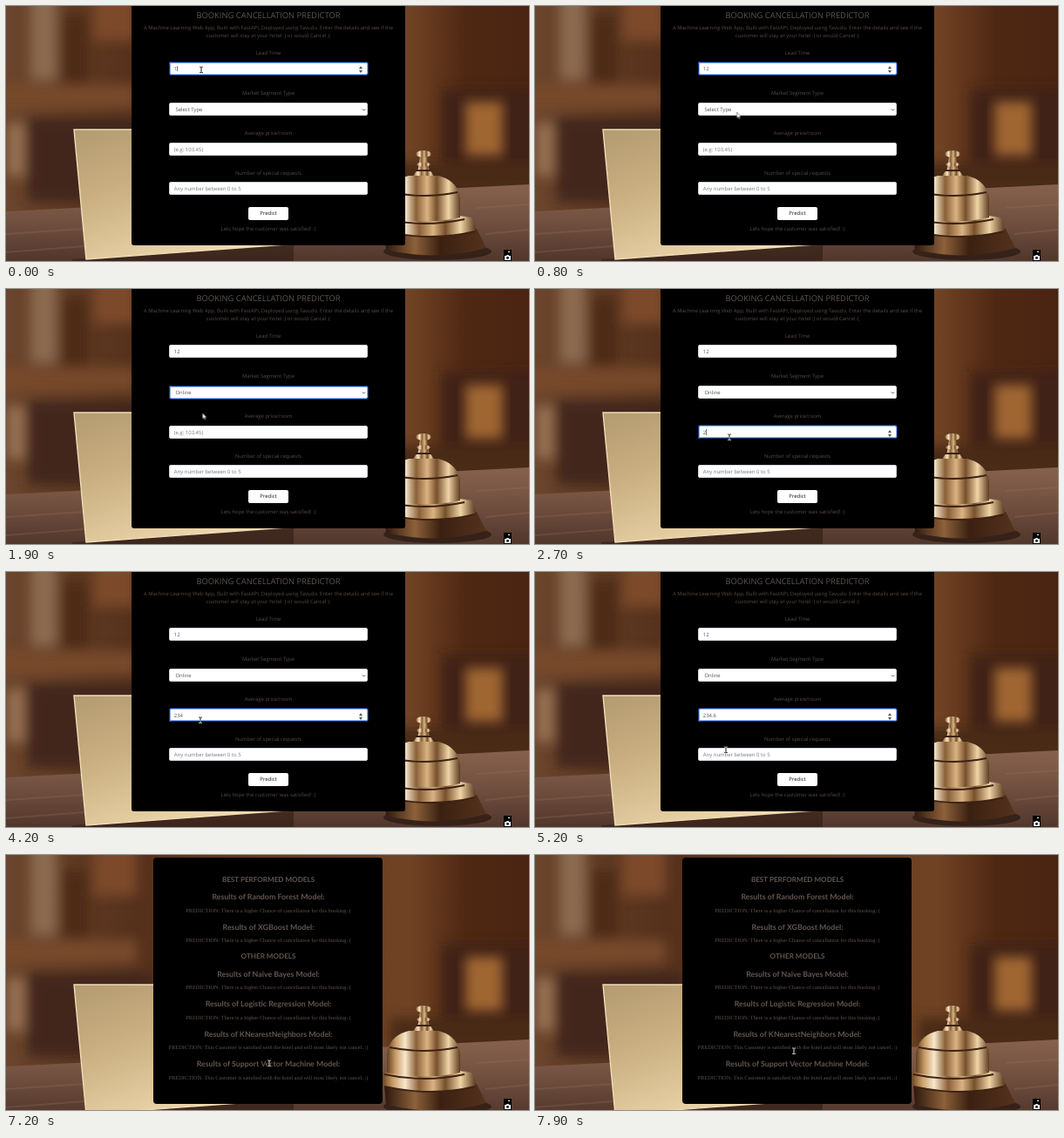
An HTML page that plays this animation: 600 by 293 pixels, repeating every 8000 ms.

```html
<!DOCTYPE html>
<html lang="en">
<head>
<meta charset="utf-8">
<title>Booking cancellation predictor</title>
<style>
html, body { margin: 0; width: 100%; height: 100%; overflow: hidden; background: #3a2417; }
#stage { position: relative; width: 600px; height: 293px; overflow: hidden; font: 5.95px/9px "Open Sans", sans-serif; color: #564a44; text-rendering: geometricPrecision; }
#stage *, #stage *::before, #stage *::after { box-sizing: border-box; }
.abs, .panel, .text, .field, .focus, .pointer, .pointer svg { position: absolute; }
.timed { animation: var(--a) 8s step-end infinite; }
.fade { animation: var(--a) 8s linear infinite; }
.page { position: absolute; inset: 0; }
.panel { background: #000; }
.text { left: 1px; width: 600px; top: calc(var(--y) * 1px - 4.5px); margin: 0; text-align: center; }
h1.text { font-size: 9.38px; font-weight: 400; color: #62564f; }
h2.text { font: 700 8.1px/9px Lato, sans-serif; color: #62564f; }
h3.text { font: 700 8.8px/9px Lato, sans-serif; color: #62564f; }
.result p { font: 6.3px/9px "Liberation Serif", serif; color: #5d514c; }

.field { left: 187px; top: calc(var(--y) * 1px); width: 228px; height: 15px; padding: 3px 4.8px; background: #fff; border: .5px solid #ced4da; border-radius: 2px; color: #505358; white-space: nowrap; }
.select { padding-left: 6.4px; }
.value::before { content: ""; animation: var(--v) 8s step-end infinite; }
.value::after { content: ""; display: inline-block; width: .6px; height: 6.5px; margin-left: .2px; vertical-align: -1px; background: #777; opacity: 0; animation: var(--c, none) 8s step-end infinite; }
.focus { inset: -.5px; border: 1px solid #86b0f5; border-radius: 2px; box-shadow: 0 0 0 1px #15377c; opacity: 0; }
.focus svg { position: absolute; right: 4px; top: 2.5px; }
.chevron { position: absolute; right: 1.5px; top: 5px; }
.menu { left: 187.5px; top: 126px; width: 227px; height: 27px; background: #fff; border: .5px solid #777; box-shadow: 0 4px 8px #55506a66; opacity: 0; }
.menu div { height: 8.8px; padding-left: 6px; line-height: 8.6px; color: #333; }
.button { left: 278px; top: 231px; width: 46px; height: 15px; border-radius: 2px; line-height: 15px; text-align: center; color: #111; background: #fff; font-weight: 500; }

.pointer { left: 0; top: 0; animation: travel 8s infinite ease-in-out; }
.pointer svg { left: -6px; top: -6px; overflow: visible; }
.beam { mix-blend-mode: difference; }

@keyframes form { 0% { visibility: visible } 88.75%, 100% { visibility: hidden } }
@keyframes result { 0% { visibility: hidden } 88.75%, 100% { visibility: visible } }
@keyframes scene { 0% { transform: none } 88.75%, 100% { transform: translateY(7px) } }

@keyframes lead { 0% { content: "1" } 2.5%, 100% { content: "12" } }
@keyframes segment { 0% { content: "Select Type" } 21.25%, 100% { content: "Online" } }
@keyframes price {
  0% { content: "(e.g: 103.45)"; color: #73777c }
  32.5% { content: "2"; color: #505358 }
  38.75% { content: "23"; color: #505358 }
  46.25% { content: "234"; color: #505358 }
  54.4% { content: "234."; color: #505358 }
  58.1%, 100% { content: "234.6"; color: #505358 }
}
@keyframes requests {
  0% { content: "Any number between 0 to 5"; color: #73777c }
  74%, 100% { content: "2"; color: #505358 }
}
@keyframes leadCaret { 0% { opacity: 1 } 8.75%, 100% { opacity: 0 } }
@keyframes priceCaret {
  0%, 45% { opacity: 0 } 32.5%, 46.25% { opacity: 1 }
  52.5% { opacity: 0 } 54.4% { opacity: 1 } 64.3%, 100% { opacity: 0 }
}
@keyframes requestsCaret { 0% { opacity: 0 } 74% { opacity: 1 } 80.25%, 100% { opacity: 0 } }

@keyframes leadFocus { 0%, 12.5% { opacity: 1 } 14%, 100% { opacity: 0 } }
@keyframes segmentFocus { 0%, 12.5% { opacity: 0 } 14%, 29% { opacity: 1 } 30.5%, 100% { opacity: 0 } }
@keyframes priceFocus { 0%, 29% { opacity: 0 } 30.5%, 69% { opacity: 1 } 70.5%, 100% { opacity: 0 } }
@keyframes requestsFocus { 0%, 69% { opacity: 0 } 70.5%, 82.7% { opacity: 1 } 84.2%, 100% { opacity: 0 } }
@keyframes menu { 0% { opacity: 0 } 13% { opacity: 1 } 21.25%, 100% { opacity: 0 } }
@keyframes hoverFirst { 0% { background: #b9b9b9; color: #fff } 17%, 100% { background: #fff; color: #333 } }
@keyframes hoverSecond { 0% { background: #fff; color: #333 } 17%, 100% { background: #b9b9b9; color: #fff } }
@keyframes press {
  0%, 81.5% { background: #fff; box-shadow: 0 0 0 0 #4f6fa5 }
  83.5%, 100% { background: #d3d4d5; box-shadow: 0 0 0 .6px #4f6fa5 }
}

@keyframes travel {
  0%, 5% { transform: translate(224px, 73px) }
  11%, 16% { transform: translate(232px, 128px) }
  18.5%, 22% { transform: translate(226px, 140px) }
  28%, 60% { transform: translate(223px, 170px) }
  65% { transform: translate(219px, 204px) }
  67.5%, 76% { transform: translate(220px, 210px) }
  81.5%, 90% { transform: translate(302px, 239px) }
  96%, 100% { transform: translate(297px, 225px) }
}
@keyframes beam { 0% { opacity: 1 } 7% { opacity: 0 } 27% { opacity: 1 } 81% { opacity: 0 } 88.75%, 100% { opacity: 1 } }
@keyframes arrow { 0% { opacity: 0 } 7% { opacity: 1 } 27%, 100% { opacity: 0 } }
@keyframes hand { 0% { opacity: 0 } 81% { opacity: 1 } 88.75%, 100% { opacity: 0 } }
</style>
</head>
<body>
<div id="stage">
  <svg class="abs" width="600" height="293">
    <defs>
      <filter id="soft" x="-20%" y="-20%" width="140%" height="140%"><feGaussianBlur stdDeviation="7"/></filter>
      <linearGradient id="wall">
        <stop stop-color="#6b452c"/><stop offset=".25" stop-color="#55301b"/>
        <stop offset=".77" stop-color="#704324"/><stop offset=".88" stop-color="#4f2813"/><stop offset="1" stop-color="#4a2412"/>
      </linearGradient>
      <linearGradient id="table" x2="0" y2="1">
        <stop stop-color="#86614d"/><stop offset=".45" stop-color="#735141"/><stop offset="1" stop-color="#50362b"/>
      </linearGradient>
      <linearGradient id="card" x2=".6" y2="1">
        <stop stop-color="#b39a70"/><stop offset=".4" stop-color="#c8ae80"/><stop offset="1" stop-color="#efd9ae"/>
      </linearGradient>
      <linearGradient id="brass">
        <stop stop-color="#5f3d20"/><stop offset=".12" stop-color="#c99d68"/><stop offset=".25" stop-color="#f8e8cb"/>
        <stop offset=".4" stop-color="#8a6038"/><stop offset=".55" stop-color="#d9b483"/><stop offset=".68" stop-color="#77502c"/>
        <stop offset=".84" stop-color="#f0d4a6"/><stop offset="1" stop-color="#5f3d20"/>
      </linearGradient>
      <linearGradient id="foot">
        <stop stop-color="#2c170c"/><stop offset=".3" stop-color="#8d613a"/><stop offset=".55" stop-color="#3b2011"/><stop offset="1" stop-color="#54331d"/>
      </linearGradient>
    </defs>
    <g class="timed" style="--a:scene">
      <path fill="url(#wall)" d="M0-10H600V250H0z"/>
      <g filter="url(#soft)">
        <path fill="#8c6a4f" d="M28-20H58V85H28z"/>
        <path fill="#4d2b19" d="M64 10H95V95H64z"/>
        <path fill="#7b4a29" d="M100-20H150V40H100z"/>
        <path fill="#77492c" d="M-20 90H150V118H-20z"/>
        <path fill="#42261a" d="M25 128H170V225H25z"/>
        <path fill="#9a7354" d="M2 135H20V195H2z"/>
        <path fill="#3f2012" d="M500 95H620V190H500z"/>
        <path fill="#4a2a18" d="M440 180H620V215H440z"/>
      </g>
      <path fill="#a06631" d="M527 110H570V172H527z" filter="url(#soft)"/>
      <path fill="url(#table)" d="M0 236L600 205V294H0z"/>
      <path d="M0 262L90 256M0 283L90 276M540 232L600 228M550 262L600 257" stroke="#9b7660" stroke-width="2" opacity=".25"/>
      <path fill="#2f1c13" d="M76 291L330 275V294H76z" opacity=".6"/>
      <path fill="url(#card)" d="M78 142H320V274L92 291z"/>
      <path d="M320 142H78L92 291L320 274" fill="none" stroke="#f0ddb6" stroke-width="1.4"/>
      <ellipse cx="495" cy="282" rx="62" ry="10" fill="#21120b" opacity=".6"/>
      <path fill="url(#foot)" d="M434 256H540L551 278Q495 294 436 280z"/>
      <g fill="url(#brass)">
        <path d="M431 243Q482 235 534 243Q540 252 538 259Q488 271 433 259z"/>
        <path d="M437 243V222Q439 201 462 195H496Q519 201 521 222V243Q480 252 437 243z"/>
        <path d="M475 173H483L485 187L491 195H467L473 187z"/>
        <ellipse cx="479" cy="170" rx="9" ry="4"/>
        <ellipse cx="479" cy="182" rx="8" ry="2.5"/>
      </g>
      <path d="M434 245Q480 255 526 245M434 259Q488 271 538 259M470 189H488M440 214Q479 222 518 214" fill="none" stroke="#3c2212" stroke-width="1.8"/>
    </g>
  </svg>

  <main class="page timed" style="--a:form">
    <div class="panel" style="left:144px;top:0;width:314px;height:274.5px;border-radius:0 0 3px 3px"></div>
    <h1 class="text" style="--y:10.5">BOOKING CANCELLATION PREDICTOR</h1>
    <p class="text" style="--y:25">A Machine Learning Web App, Built with FastAPI, Deployed using Tavudo. Enter the details and see if the<br>customer will stay at your hotel :) or would Cancel :(</p>
    <p class="text" style="--y:54">Lead Time</p>
    <p class="text" style="--y:100">Market Segment Type</p>
    <p class="text" style="--y:146.5">Average price/room</p>
    <p class="text" style="--y:192">Number of special requests</p>
    <p class="text" style="--y:256">Lets hope the customer was satisfied! :)</p>

    <div class="field" style="--y:64"><span class="value" style="--v:lead;--c:leadCaret"></span>
      <div class="focus fade" style="--a:leadFocus"><svg width="6" height="10"><path d="M1 4L3 1 5 4zM1 6L3 9 5 6z" fill="#555"/></svg></div></div>
    <div class="field select" style="--y:111"><span class="value" style="--v:segment"></span>
      <svg class="chevron" width="5" height="5"><path d="M1 1.5L2.5 3 4 1.5" fill="none" stroke="#333" stroke-width=".9"/></svg>
      <div class="focus fade" style="--a:segmentFocus"></div></div>
    <div class="field" style="--y:156.5"><span class="value" style="--v:price;--c:priceCaret"></span>
      <div class="focus fade" style="--a:priceFocus"><svg width="6" height="10"><path d="M1 4L3 1 5 4zM1 6L3 9 5 6z" fill="#555"/></svg></div></div>
    <div class="field" style="--y:202"><span class="value" style="--v:requests;--c:requestsCaret"></span>
      <div class="focus fade" style="--a:requestsFocus"></div></div>
    <div class="abs menu timed" style="--a:menu">
      <div class="timed" style="--a:hoverFirst">Select Type</div>
      <div class="timed" style="--a:hoverSecond">Online</div>
      <div>Other</div>
    </div>
    <div class="abs button fade" style="--a:press">Predict</div>
  </main>

  <main class="page result timed" style="--a:result">
    <div class="panel" style="left:169px;top:2.5px;width:263px;height:283px;border-radius:4px"></div>
    <h2 class="text" style="--y:28">BEST PERFORMED MODELS</h2>
    <h3 class="text" style="--y:47.5">Results of Random Forest Model:</h3>
    <p class="text" style="--y:64">PREDICTION: There is a higher Chance of cancellation for this booking.:(</p>
    <h3 class="text" style="--y:82">Results of XGBoost Model:</h3>
    <p class="text" style="--y:98.5">PREDICTION: There is a higher Chance of cancellation for this booking.:(</p>
    <h2 class="text" style="--y:116.5">OTHER MODELS</h2>
    <h3 class="text" style="--y:136">Results of Naive Bayes Model:</h3>
    <p class="text" style="--y:152.5">PREDICTION: There is a higher Chance of cancellation for this booking.:(</p>
    <h3 class="text" style="--y:170.5">Results of Logistic Regression Model:</h3>
    <p class="text" style="--y:187">PREDICTION: There is a higher Chance of cancellation for this booking.:(</p>
    <h3 class="text" style="--y:205">Results of KNearestNeighbors Model:</h3>
    <p class="text" style="--y:221.5">PREDICTION: This Customer is satisfied with the hotel and will most likely not cancel..:)</p>
    <h3 class="text" style="--y:239.5">Results of Support Vector Machine Model:</h3>
    <p class="text" style="--y:256">PREDICTION: This Customer is satisfied with the hotel and will most likely not cancel..:)</p>
  </main>

  <svg class="abs" style="left:571px;top:280px" width="9" height="13">
    <path d="M0 0H9V13H0z"/>
    <path d="M1 7H3L3.5 6H5.5L6 7H8V12H1zM5 2H7V3H5z" fill="#fff"/>
    <circle cx="4.5" cy="9.4" r="1.4"/>
  </svg>

  <div class="pointer beam"><svg class="timed" style="--a:beam" width="12" height="12"><path d="M4.2 3H5.5L6 3.5 6.5 3H7.8M6 3.5V9M4.2 9.5H5.5L6 9 6.5 9.5H7.8" fill="none" stroke="#fff" stroke-width=".9"/></svg></div>
  <div class="pointer"><svg class="timed" style="--a:arrow" width="12" height="12"><path d="M6 3V10L7.6 8.6 8.7 11 9.7 10.5 8.7 8.2H10.8z" fill="#fff" stroke="#222" stroke-width=".5"/></svg></div>
  <div class="pointer"><svg class="timed" style="--a:hand" width="12" height="12"><path d="M5 8V2.7Q5.6 1.8 6.2 2.7V5.5L9.2 6.2V9L8.4 11H5.2L3 7.6Q3.5 6.8 5 8z" fill="#fff" stroke="#222" stroke-width=".6"/></svg></div>
</div>
</body>
</html>
```
